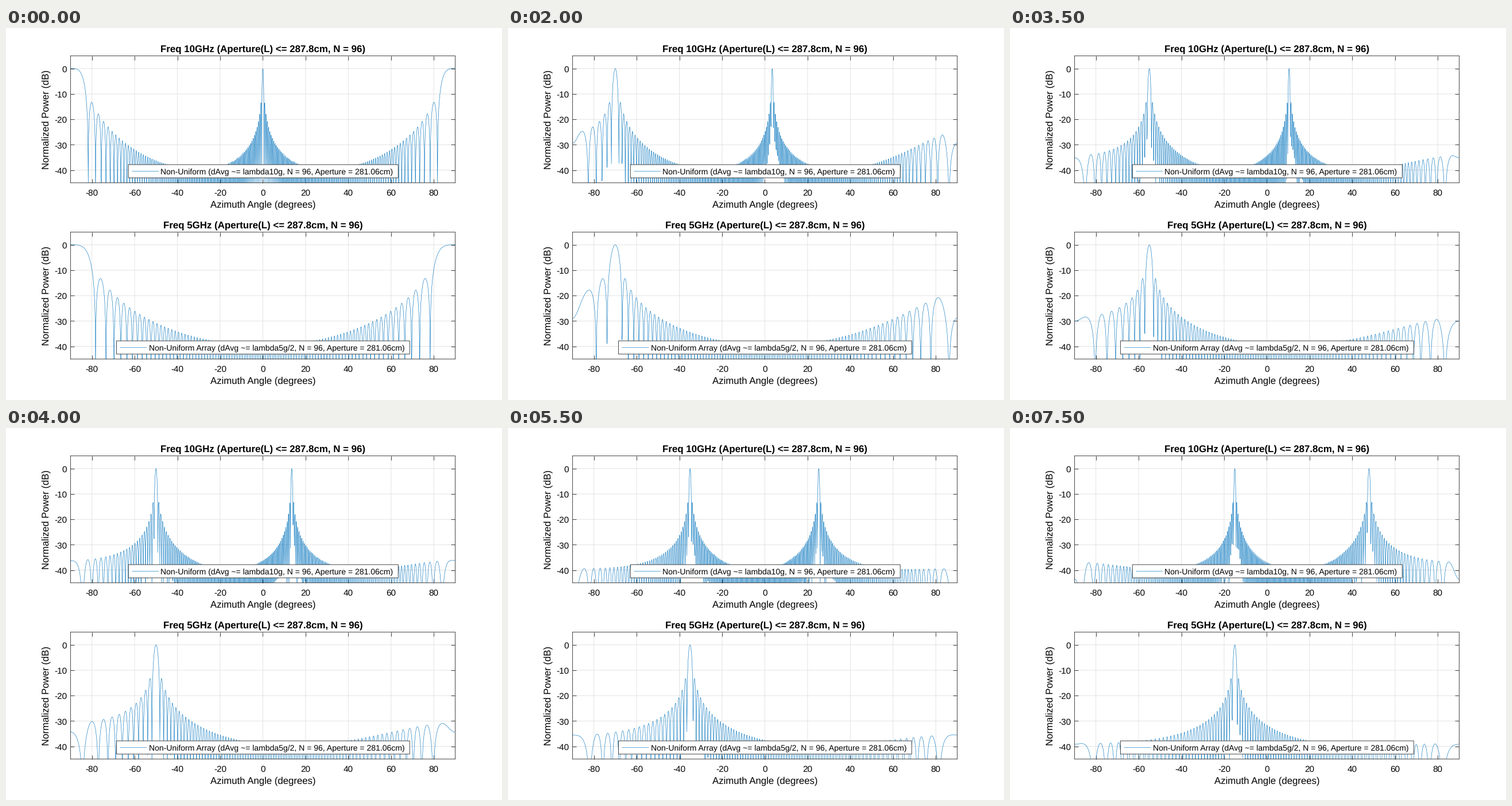
Animation, 864 px wide and 648 px high, one loop 8 s. Source, as a matplotlib script:

```python
import numpy as np
import matplotlib.pyplot as plt
from matplotlib.animation import FuncAnimation
from matplotlib.patches import Rectangle

plt.rcParams.update({
    "font.family": "Liberation Sans",
    "path.simplify": False,
    "text.hinting": "none",
})

W, H, DPI = 864, 648, 72  # at 72 dpi one point is one pixel
BLUE, DARK, GRID = "#0072BD", "#262626", "#dfdfdf"
LEFT, WIDTH, HEIGHT = 112.4, 670, 221.1
TICK, LABEL, TITLE, LEGEND = 15.2, 16.75, 16.9, 14.0
THIN, FRAME = 0.6, 0.85  # line widths of curves and axes

N = 96
FRAMES, INTERVAL = 16, 500
START, STEP = -90, 5  # steering angle in degrees

theta = np.linspace(-90, 90, 1801)
sin_theta = np.sin(np.radians(theta))
elements = np.arange(N)

fig = plt.figure(figsize=(W / DPI, H / DPI), dpi=DPI, facecolor="white")


def text(x, y, s, size, ha="center", **kw):
    """Text at pixel x, baseline y, counted from the top left."""
    fig.text(x / W, 1 - y / H, s, fontsize=size, color="black", ha=ha,
             va="baseline", rotation_mode="anchor", **kw)


def pattern(spacing, steer):
    """Normalized array factor in dB; spacing in wavelengths."""
    u = spacing * (sin_theta - np.sin(np.radians(steer)))
    af = np.abs(np.exp(2j * np.pi * np.outer(u, elements)).mean(axis=1))
    return 20 * np.log10(np.maximum(af, 1e-12))


def legend(x0, x1, y0, label):
    fig.add_artist(Rectangle((x0 / W, 1 - (y0 + 23) / H), (x1 - x0) / W, 23 / H,
                             fc="white", ec=DARK, lw=FRAME, zorder=5))
    y = 1 - (y0 + 11.7) / H
    fig.add_artist(plt.Line2D([(x0 + 6.5) / W, (x0 + 52.5) / W], [y, y],
                              color=BLUE, lw=THIN, zorder=6))
    text(x0 + 56.2, y0 + 16.9, label, LEGEND, "left", zorder=6)


def panel(top, freq):
    ax = fig.add_axes([LEFT / W, 1 - (top + HEIGHT) / H, WIDTH / W, HEIGHT / H])
    ax.set(xlim=(-90, 90), ylim=(-45, 5),
           xticks=range(-80, 81, 20), yticks=range(-40, 1, 10))
    ax.set_axisbelow(True)
    ax.grid(color=GRID, lw=FRAME)
    ax.tick_params(direction="in", length=6.7, width=FRAME, color=DARK, top=True,
                   right=True, labelbottom=False, labelleft=False)
    for spine in ax.spines.values():
        spine.set(color=DARK, linewidth=FRAME)

    for v in range(-80, 81, 20):
        text(LEFT + (v + 90) / 180 * WIDTH, top + 243, str(v), TICK)
    for v in range(-40, 1, 10):
        text(106, top + (5 - v) / 50 * HEIGHT + 6, str(v), TICK, "right")

    mid = LEFT + WIDTH / 2
    text(mid, top - 6.8, f"Freq {freq}GHz (Aperture(L) <= 287.8cm, N = 96)",
         TITLE, weight="bold")
    text(mid, top + 264.2, "Azimuth Angle (degrees)", LABEL)
    text(74.6, top + HEIGHT / 2, "Normalized Power (dB)", LABEL, rotation=90)

    return ax.plot(theta, np.zeros_like(theta), color=BLUE, lw=THIN)[0]


# (curve, element spacing in wavelengths)
curves = [(panel(48.6, 10), 1.0), (panel(355.6, 5), 0.5)]

legend(213.2, 683.2, 238,
       "Non-Uniform (dAvg ~= lambda10g, N = 96, Aperture = 281.06cm)")
legend(192.4, 703.2, 545,
       "Non-Uniform Array (dAvg ~= lambda5g/2, N = 96, Aperture = 281.06cm)")

for artist in fig.findobj():
    artist.set_snap(False)


def update(i):
    for line, spacing in curves:
        line.set_ydata(pattern(spacing, START + STEP * i))
    return [line for line, _ in curves]


anim = FuncAnimation(fig, update, frames=FRAMES, interval=INTERVAL,
                     repeat=True, repeat_delay=0, blit=False)
plt.show()
```
